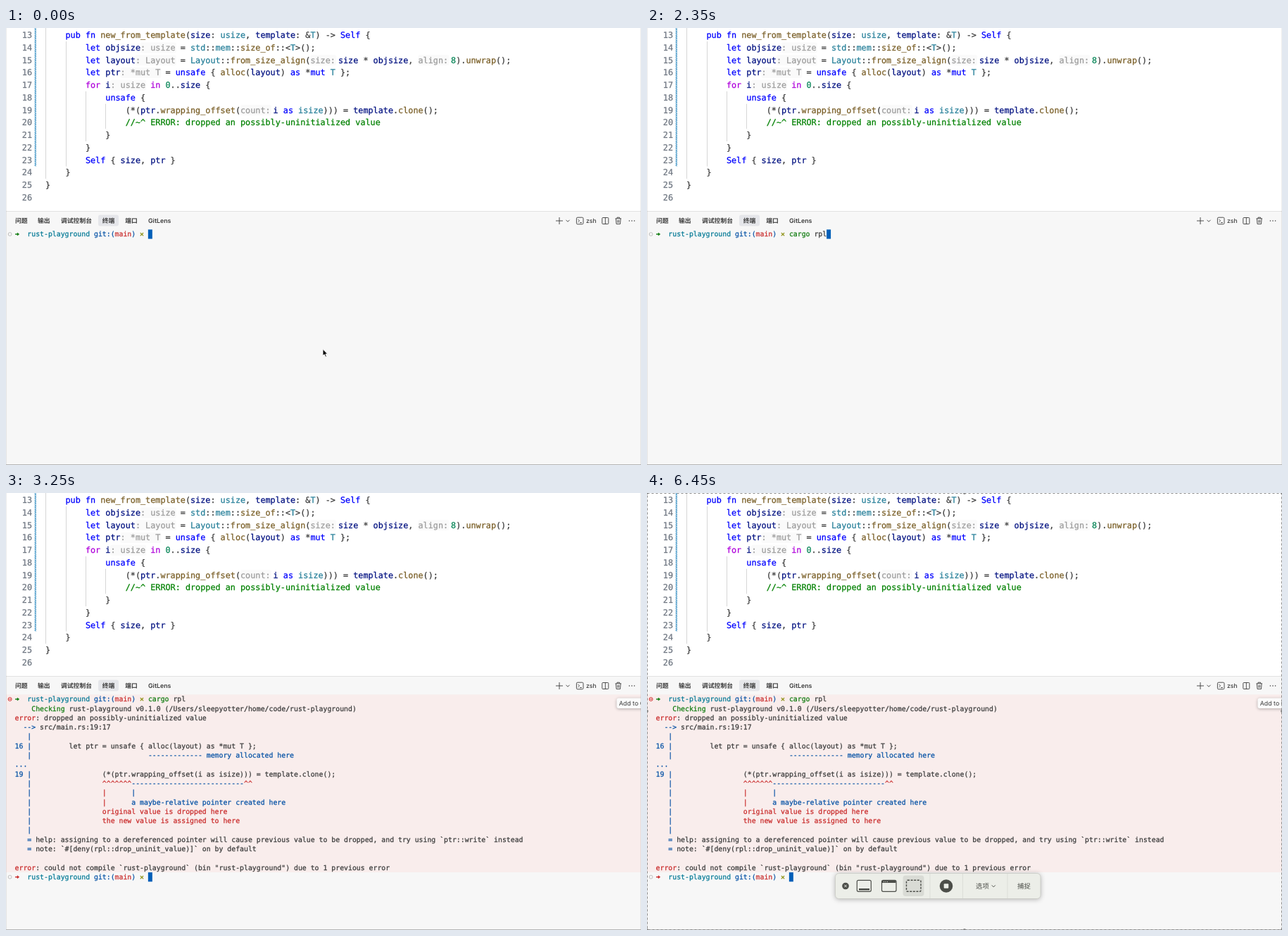
An HTML page with a canvas for the animation above (6.55 s loop, 902 px wide and 621 px high).

```html
<!DOCTYPE html>
<html lang="zh">
<head>
<meta charset="utf-8">
<style>
  html, body { margin: 0; width: 100%; height: 100%; overflow: hidden; background: #fff; }
  canvas { display: block; }
</style>
</head>
<body>
<canvas id="stage" width="902" height="621"></canvas>
<script>
const ctx = document.getElementById('stage').getContext('2d');
const W = 902, H = 621, LOOP = 6550;
const INK = '#3b3b3b', PANEL = '#f7f7f7';
const MONO = '"DejaVu Sans Mono", monospace';
const UI = 'Inter, "Noto Sans CJK SC", "Noto Sans CJK", sans-serif';

// One-letter colour names, used in text after a "§" mark.
const COLORS = {
  d: INK, b: '#0000ff', p: '#af00db', f: '#795e26', t: '#267f99', v: '#001080',
  m: '#008000', n: '#098658', h: '#9b9b9b', H: '#9b9b9b',
  c: '#047a96', g: '#107c10', u: '#0451a5', r: '#c92a2a', y: '#858900'
};
const CODE = { x: 56.1, y: 14.2, col: 7.1, row: 17.75, font: `11.8px ${MONO}` };
const TERM = { x: 12.6, y: 296.2, col: 5.917, row: 13.3, font: `9.83px ${MONO}` };

const codeLines = [
  '    §bpub fn §fnew_from_template§d(§vsize§d: §tusize§d, §vtemplate§d: &§tT§d) -> §bSelf§d {',
  '        §blet §vobjsize§h: usize§d = §tstd§d::§tmem§d::§fsize_of§d::<§tT§d>();',
  '        §blet §vlayout§h: Layout§d = §tLayout§d::§ffrom_size_align§d(§Hsize:§vsize§d * §vobjsize§d, §Halign:§n8§d).§funwrap§d();',
  '        §blet §vptr§h: *mut T§d = §bunsafe§d { §falloc§d(§vlayout§d) §bas §d*§bmut §tT§d };',
  '        §pfor §vi§h: usize§d §pin §n0§d..§vsize§d {',
  '            §bunsafe§d {',
  '                (*(§vptr§d.§fwrapping_offset§d(§Hcount:§vi §bas §tisize§d))) = §vtemplate§d.§fclone§d();',
  '                §m//~^ ERROR: dropped an possibly-uninitialized value',
  '            }',
  '        }',
  '        §bSelf§d { §vsize§d, §vptr§d }',
  '    }',
  '}',
  ''
];

const promptLine = '   §crust-playground §ugit:(§rmain§u) §y✕ ';
const checkingLine = '    §gChecking§d rust-playground v0.1.0 (/Users/sleepyotter/home/code/rust-playground)';
const buildingLine = `    §cBuilding§d [${' '.repeat(29)}] 0/1: rust-playground(bin)`;
const bar = '   §u|';
const pad = n => ' '.repeat(n);
const reportLines = [
  '§rerror§d: dropped an possibly-uninitialized value',
  '  §u-->§d src/main.rs:19:17',
  bar,
  `§u16 |§d${pad(9)}let ptr = unsafe { alloc(layout) as *mut T };`,
  `${bar}${pad(28)}${'-'.repeat(13)} memory allocated here`,
  '§u...',
  `§u19 |§d${pad(17)}(*(ptr.wrapping_offset(i as isize))) = template.clone();`,
  `${bar}${pad(17)}§r^^^^^^^§u${'-'.repeat(27)}§r^^`,
  `${bar}${pad(17)}§r|§u${pad(6)}|`,
  `${bar}${pad(17)}§r|§u${pad(6)}a maybe-relative pointer created here`,
  `${bar}${pad(17)}§roriginal value is dropped here`,
  `${bar}${pad(17)}§rthe new value is assigned to here`,
  bar,
  '   §u=§d help: assigning to a dereferenced pointer will cause previous value to be dropped, and try using `ptr::write` instead',
  '   §u=§d note: `#[deny(rpl::drop_uninit_value)]` on by default',
  ''
];
const failedLine = '§rerror§d: could not compile `rust-playground` (bin "rust-playground") due to 1 previous error';

const COMMAND = 'cargo rpl';
const keyTimes = [750, 880, 1010, 1140, 1280, 1500, 1750, 1950, 2200];

function rect(x, y, w, h, color) {
  ctx.fillStyle = color;
  ctx.fillRect(x, y, w, h);
}

function round(x, y, w, h, r, fill, stroke, lineWidth = 1) {
  ctx.beginPath();
  ctx.roundRect(x, y, w, h, r);
  if (fill) { ctx.fillStyle = fill; ctx.fill(); }
  if (stroke) { ctx.strokeStyle = stroke; ctx.lineWidth = lineWidth; ctx.stroke(); }
}

function path(d, stroke = INK, lineWidth = 0.9, fill) {
  const shape = new Path2D(d);
  if (fill) { ctx.fillStyle = fill; ctx.fill(shape); }
  ctx.strokeStyle = stroke;
  ctx.lineWidth = lineWidth;
  ctx.stroke(shape);
}

function disc(x, y, r, fill, stroke) {
  round(x - r, y - r, 2 * r, 2 * r, r, fill, stroke);
}

function label(text, x, y, size = 8.8, weight = 500, color = INK) {
  ctx.font = `${weight} ${size}px ${UI}`;
  ctx.fillStyle = color;
  ctx.fillText(text, x, y);
}

// The thin outline gives the letters a slightly heavier weight.
function glyphs(text, grid, x, y, color) {
  ctx.font = grid.font;
  ctx.fillStyle = ctx.strokeStyle = color;
  ctx.lineWidth = 0.25;
  [...text].forEach((ch, i) => {
    if (ch === ' ') return;
    ctx.fillText(ch, x + i * grid.col, y);
    ctx.strokeText(ch, x + i * grid.col, y);
  });
}

// Draws marked text on a character grid.
function gridText(grid, row, marked, startCol = 0) {
  let x = grid.x + startCol * grid.col;
  const y = grid.y + row * grid.row;
  for (const part of ('d' + marked).split('§')) {
    const kind = part[0], text = part.slice(1);
    const width = text.length * grid.col;
    if (kind === 'h' || kind === 'H') round(x, y - 11.5, width + 1, 15, 2, '#fafafa');
    glyphs(text, grid, x, y, COLORS[kind]);
    x += width + (kind === 'H' ? 4 : 0);
  }
}

function drawEditor() {
  const top = line => 1.3 + (line - 13) * CODE.row;
  const guides = [[0, 12, 25], [4, 14, 24], [8, 18, 22], [12, 19, 21]];
  for (const [col, from, to] of guides) {
    rect(Math.round(CODE.x + col * CODE.col), top(from), 1, top(to) - top(from), '#d6d6d6');
  }
  ctx.save();
  ctx.beginPath();
  ctx.rect(40.6, 0, 2.4, top(24));
  ctx.clip();
  for (let y = -2; y < 200; y += 2.6) path(`M40 ${y + 3}L44 ${y}`, '#2585bd', 1.2);
  ctx.restore();
  codeLines.forEach((line, i) => {
    glyphs(String(13 + i), CODE, 22.8, CODE.y + i * CODE.row, '#6e7681');
    gridText(CODE, i, line);
  });
}

function drawPanelHeader(running) {
  rect(0, 260.5, W, H - 260.5, PANEL);
  rect(0, 260, W, 1, '#e2e2e2');
  round(131, 265.5, 29, 16, 3, '#e5e6ea');
  const tabs = [['问题', 13], ['输出', 45], ['调试控制台', 78], ['终端', 136.8], ['端口', 169.3], ['GitLens', 202]];
  for (const [name, x] of tabs) label(name, x, 276.6, 8.8, 600);

  ctx.save();
  if (running) ctx.translate(-22.5, 0);
  path('M786 269V279M781 274H791');
  path('M795.5 272.8L798 275.3L800.5 272.8');
  round(810.4, 269.2, 9.6, 9.6, 1.5, null, INK, 0.9);
  path('M812.4 271.8L814.6 274L812.4 276.2M815 276.6H818');
  ctx.restore();
  label(running ? 'cargo-rpl' : 'zsh', running ? 801.3 : 824, 276.9, 8.6, 500);
  round(846.8, 269.5, 9, 9, 1, null, INK, 0.9);
  path('M851.3 269.5V278.5');
  path('M865.5 270.8H874M868 270.5V269.2H871.5V270.5M866.4 271L867 278.5H872.5L873.1 271M868.8 272.8V276.8M870.7 272.8V276.8');
  for (const x of [885.4, 889, 892.6]) disc(x, 274, 0.8, INK);
}

function drawPrompt(row, arrowColor) {
  const y = 293 + row * TERM.row;
  gridText(TERM, row, promptLine);
  path(`M13 ${y}H17`, arrowColor, 1.4);
  path(`M16 ${y - 2}L18.8 ${y}L16 ${y + 2}Z`, arrowColor, 0.5, arrowColor);
}

function drawStatus(row, failed) {
  const y = 293 + row * TERM.row;
  if (!failed) return disc(5.6, y, 2.4, null, '#bdbdbd');
  disc(5.6, y, 2.5, null, '#d32f2f');
  path(`M4.6 ${y - 1}L6.6 ${y + 1}M6.6 ${y - 1}L4.6 ${y + 1}`, '#d32f2f', 0.8);
}

function drawCursor(col, row) {
  rect(TERM.x + col * TERM.col - 0.1, 286.4 + row * TERM.row, 6, 13.2, '#005fb8');
}

function drawTerminal(t) {
  const done = t >= 3100, failed = t >= 3200, reported = t >= 3000;
  if (failed) rect(0, 286.4, W, 19 * TERM.row - 0.2, '#f9edec');

  const typed = COMMAND.slice(0, keyTimes.filter(k => k <= t).length);
  const word = typed.slice(0, 5);
  drawStatus(0, failed);
  drawPrompt(0, COLORS.g);
  gridText(TERM, 0, `§${word === 'cargo' ? 'g' : 'r'}${word}§d${typed.slice(5)}`, 32);

  if (t < 2750) return drawCursor(32 + typed.length, 0);
  if (t < 2850) return drawCursor(0, 1);
  gridText(TERM, 1, checkingLine);
  if (reported) reportLines.forEach((line, i) => gridText(TERM, i + 2, line));
  const lastRow = reported ? 18 : 2;
  gridText(TERM, lastRow, done ? failedLine : buildingLine);
  if (!done) return drawCursor(0, lastRow);
  drawStatus(19, false);
  drawPrompt(19, COLORS.r);
  drawCursor(32, 19);
}

function shadowed(blur, draw) {
  ctx.save();
  ctx.shadowColor = 'rgba(0,0,0,.3)';
  ctx.shadowBlur = blur;
  ctx.shadowOffsetY = 1;
  draw();
  ctx.restore();
}

function drawTooltip() {
  shadowed(4, () => round(867.5, 291.5, 60, 14.5, 3, '#fbfbfb'));
  label('Add to Chat', 870.8, 302, 8.8, 400);
}

function drawPointer(t) {
  const p = Math.max(0, Math.min(1, (t - 50) / 300));
  if (p === 1) return;
  const ease = p * p * (3 - 2 * p);
  ctx.save();
  ctx.translate(450 + 460 * ease, 456.3 - 150 * ease);
  path('M0 0V9.6L2.2 7.6L3.8 11.2L5.4 10.5L3.9 7H6.8Z', '#fff', 1, '#000');
  ctx.restore();
}

function drawCaptureBar() {
  const dark = '#4c4e49';
  ctx.setLineDash([3, 3]);
  round(0.5, 0.5, W - 1, H - 1, 0, null, '#8c8c8c');
  ctx.setLineDash([]);
  for (const [x, y] of [[0, 0], [451, 0], [W, 0], [0, 310], [W, 310], [0, H], [451, H], [W, H]]) {
    disc(x, y, 2, '#888');
  }

  shadowed(7, () => round(267.5, 540.5, 291.5, 36, 5, '#eceee8'));
  round(267.5, 540.5, 291.5, 36, 5, null, '#c9cbc5', 0.8);
  round(363.5, 543.5, 30, 29.5, 4, '#d9dbd5');
  for (const x of [401.5, 448, 511.5]) rect(x, 541, 1, 35, '#dcded8');

  disc(282, 558.5, 4.8, dark);
  path('M280.3 556.8L283.7 560.2M283.7 556.8L280.3 560.2', '#eceee8', 1);
  round(298.3, 550.3, 20, 16, 2, null, dark, 1.2);
  rect(301, 562, 15, 2.5, dark);
  round(333.5, 550.3, 20.5, 16, 2, null, dark, 1.2);
  rect(334, 551, 19.5, 3, dark);
  for (const x of [336, 338.5, 341]) rect(x, 552, 1, 1, '#eceee8');
  ctx.setLineDash([3, 1.6]);
  round(368.5, 550.3, 20.5, 16, 1.5, null, dark, 1.4);
  ctx.setLineDash([]);
  disc(425, 558.5, 9.3, dark);
  round(421.7, 555.2, 6.6, 6.6, 1, '#eceee8');
  label('选项', 467, 562, 9.4, 400, dark);
  path('M489.8 557.4L492.3 559.9L494.8 557.4', dark, 1);
  label('捕捉', 526, 562, 9.4, 400, dark);
}

function draw(t) {
  rect(0, 0, W, H, '#fff');
  ctx.textRendering = 'geometricPrecision';
  ctx.lineJoin = 'round';
  drawEditor();
  drawPanelHeader(t >= 2800 && t < 3150);
  drawTerminal(t);
  if (t >= 3250) drawTooltip();
  rect(0, 0, 1, H, 'rgba(0,0,0,.07)');
  rect(W - 1, 0, 1, H, 'rgba(0,0,0,.07)');
  rect(0, 620, W, 1, '#b4b4b4');
  drawPointer(t);
  if (t >= 6450) drawCaptureBar();
}

const start = performance.now();
function tick() {
  draw((performance.now() - start) % LOOP);
  requestAnimationFrame(tick);
}
tick();
</script>
</body>
</html>
```
